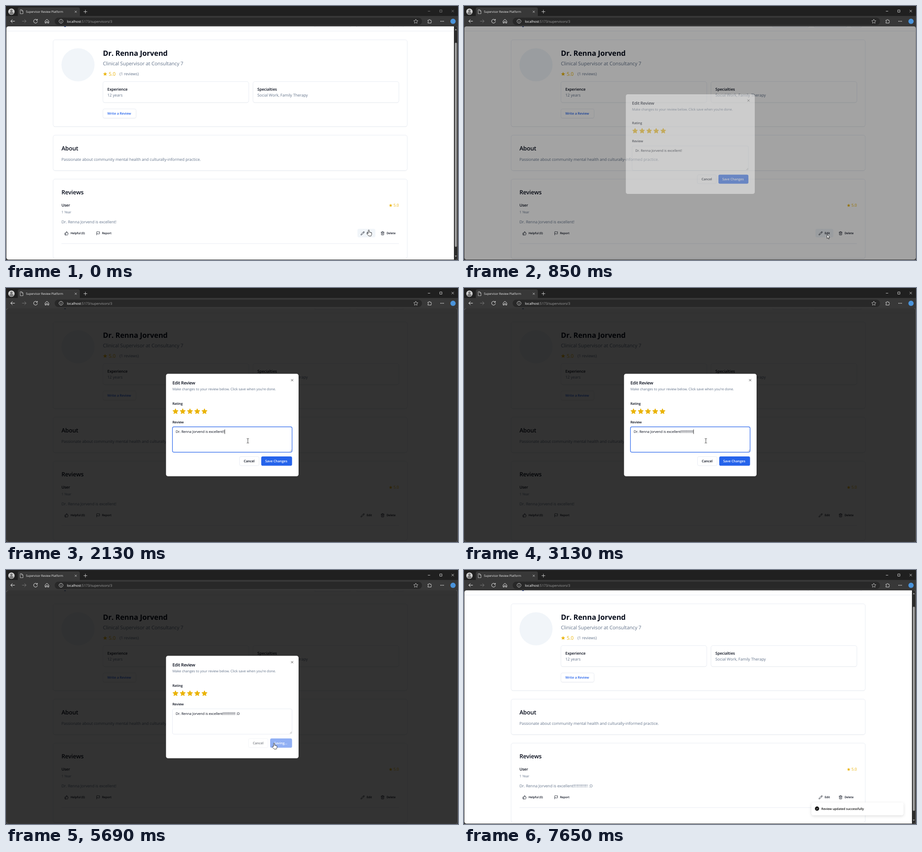
Write an HTML page that moves like this. It is 998 px wide and 561 px high and loops after 8510 ms.

```html
<!DOCTYPE html>
<html lang="en">
<head>
<meta charset="utf-8">
<title>Supervisor Review Platform</title>
<style>
html, body { margin: 0; width: 100%; height: 100%; overflow: hidden; background: #202020; }
svg { display: block; width: 100vw; height: 100vh; }
text { font-family: "Open Sans", "Noto Sans", sans-serif; white-space: pre; text-rendering: geometricPrecision; letter-spacing: -.006em; }
</style>
</head>
<body>
<svg id="stage" viewBox="0 0 998 561">
  <defs><clipPath id="view"><rect x="1" y="45" width="996.5" height="515" rx="4.5"/></clipPath></defs>
</svg>
<script>
const LOOP = 8510, STEP = 140;
const INK = '#020817', MUTED = '#64748b', LINE = '#e2e8f0', BLUE = '#2563eb', GOLD = '#eab308';
const NAME = 'Dr. Renna Jorvend';
const PRAISE = `${NAME} is excellent`;
const stage = document.getElementById('stage');
const $ = id => document.getElementById(id);
const clamp = (v, lo = 0, hi = 1) => Math.min(hi, Math.max(lo, v));

// Drawing helpers
const label = (x, y, size, str, fill = INK, weight = 400, extra = '') =>
  `<text x="${x}" y="${y}" font-size="${(size * (weight > 400 ? .935 : .955)).toFixed(2)}" font-weight="${weight}" fill="${fill}" ${extra}>${str}</text>`;
const box = (x, y, x2, y2, r, fill, extra = '') =>
  `<rect x="${x}" y="${y}" width="${x2 - x}" height="${y2 - y}" rx="${r}" fill="${fill}" ${extra}/>`;
const edge = `stroke="${LINE}" stroke-width=".8"`;
const card = (x, y, x2, y2, r = 4.5) =>
  box(x, y + .9, x2, y2 + .9, r, '#000', 'opacity=".06"') + box(x, y, x2, y2, r, '#fff', edge);
const line = (d, color, w = .9, extra = '') =>
  `<path d="${d}" fill="none" stroke="${color}" stroke-width="${w}" ${extra}/>`;
const cross = (x, y, r, color, w = .9) =>
  line(`M${x - r} ${y - r}l${2 * r} ${2 * r}M${x + r} ${y - r}l${-2 * r} ${2 * r}`, color, w);
const icon = (x, y, d) =>
  `<path transform="translate(${x - 4.57} ${y - 4.57}) scale(.381)" d="${d}" fill="none" stroke="${INK}" stroke-width="2" stroke-linecap="round" stroke-linejoin="round"/>`;
function star(cx, cy, r, inner, extra = '') {
  const pts = Array.from({ length: 10 }, (_, i) => {
    const a = i * Math.PI / 5, d = i % 2 ? r * inner : r;
    return `${(cx + d * Math.sin(a)).toFixed(2)},${(cy - d * Math.cos(a)).toFixed(2)}`;
  });
  return `<polygon points="${pts.join(' ')}" fill="${GOLD}" ${extra}/>`;
}

const ICONS = {
  thumb: 'M7 10v12M15 5.9 14 10h5.8a2 2 0 0 1 1.9 2.6l-2.3 8A2 2 0 0 1 17.5 22H4a2 2 0 0 1-2-2v-8a2 2 0 0 1 2-2h2.8a2 2 0 0 0 1.8-1.1L12 2a3.1 3.1 0 0 1 3 3.9Z',
  flag: 'M4 15s1-1 4-1 5 2 8 2 4-1 4-1V3s-1 1-4 1-5-2-8-2-4 1-4 1zM4 22v-7',
  pencil: 'M17 3a2.8 2.8 0 1 1 4 4L7.5 20.5 2 22l1.5-5.5ZM15 5l4 4',
  trash: 'M3 6h18M19 6v14c0 1-1 2-2 2H7c-1 0-2-1-2-2V6M8 6V4c0-1 1-2 2-2h4c1 0 2 1 2 2v2M10 11v6M14 11v6'
};

const browser = () => [
  box(0, 0, 998, 561, 0, '#202020'),
  box(0, 22, 998, 561, 0, '#383838'),
  box(26, 3, 163, 26, 4, '#383838'),
  '<circle cx="12" cy="12.5" r="7" fill="#cfcfcf"/><circle cx="12" cy="10.4" r="2.6" fill="#777"/><path d="M7.2 16.6a4.8 3.6 0 0 1 9.6 0a6.6 6.6 0 0 1-9.6 0z" fill="#777"/>',
  line('M31.3 8.3h3.7l2.6 2.6v6.1h-6.3zM34.8 8.5v2.6h2.6', '#e0e0e0', .8),
  label(44, 15, 6.8, 'Supervisor Review Platform', '#f2f2f2'),
  cross(154, 12.7, 2.1, '#e0e0e0', .8),
  line('M171.3 12.5h8M175.3 8.5v8', '#d8d8d8'),
  `<g id="controls">${line('M931.5 11.5h5M957.8 8.8h4.8v4.8h-4.8z', 'currentColor', .8)}${cross(986.4, 11.2, 2.5, 'currentColor', .8)}</g>`,
  line('M19.5 33.5h-9M14.4 29.6l-3.9 3.9 3.9 3.9', '#f0f0f0', 1),
  line('M35.5 33.5h9M40.6 29.6l3.9 3.9-3.9 3.9', '#777', 1),
  line('M68.7 31.2a4.2 4.2 0 1 0 .7 2.7M69.3 28.8v2.8h-2.8', '#f0f0f0', 1),
  line('M86.4 33l4-3.6 4 3.6v4.6h-2.6v-3h-2.8v3h-2.6z', '#f0f0f0', 1, 'stroke-linejoin="round"'),
  box(107.5, 25.7, 918.5, 42, 8.1, '#282828'),
  '<circle cx="121.5" cy="33.7" r="4.3" fill="none" stroke="#e0e0e0" stroke-width=".9"/>',
  line('M121.5 33v3M121.5 31v1', '#e0e0e0'),
  label(134.5, 36.6, 7.9, 'localhost<tspan fill="#9d9d9d">:5173/supervisors/3</tspan>', '#fff'),
  star(904.8, 34.1, 5, .48).replace(GOLD, 'none" stroke="#d0d0d0" stroke-width=".8'),
  line('M931.6 31.3h2.2a1.3 1.3 0 0 1 2.6 0h2.2v2.1a1.3 1.3 0 0 1 0 2.5v1.8h-7v-1.9a1.2 1.2 0 0 0 0-2.4z', '#e8e8e8', .9),
  [-3, 0, 3].map(d => `<circle cx="${963 + d}" cy="33.7" r=".85" fill="#eee"/>`).join(''),
  '<circle cx="987" cy="33.8" r="5.8" fill="#4a94dc"/>'
].join('');

const page = () => [
  box(1, 45, 998, 560, 0, '#fff'),
  line('M1 55.3H998', LINE, .8),
  '<circle cx="130.3" cy="44.8" r="1.8" fill="#1e3a8a"/>',
  [[681, 761], [773, 845], [855, 878]].map(([a, b]) => box(a, 30, b, 47, 3, '#fff', edge)).join(''),
  card(104, 74.7, 886, 266.4),
  '<circle cx="159" cy="129.9" r="36.6" fill="#f1f5f9"/>',
  label(214, 110.3, 17.14, NAME, INK, 700),
  label(214, 130.9, 11.43, 'Clinical Supervisor at Consultancy 7', MUTED),
  star(218.8, 150.4, 4.9, .4),
  label(226.7, 154, 11.43, '5.0', GOLD),
  label(250.8, 152.8, 9.14, '(1 reviews)', MUTED),
  card(214, 166.8, 536, 213.3),
  card(545.3, 166.8, 867.5, 213.3),
  label(223.7, 186.5, 9.14, 'Experience', INK, 600),
  label(223.7, 200.2, 9.14, '12 years', MUTED),
  label(555, 186.5, 9.14, 'Specialties', INK, 600),
  label(555, 200.2, 9.14, 'Social Work, Family Therapy', MUTED),
  card(214, 227.3, 287.3, 247.6, 3.4),
  label(223.7, 240.3, 8, 'Write a Review', BLUE, 600),
  card(104, 285.2, 886, 363.5),
  label(122.4, 318.6, 13.71, 'About', INK, 600),
  label(122.4, 341.5, 9.14, 'Passionate about community mental health and culturally-informed practice.', MUTED),
  card(104, 382.3, 886, 557.6),
  label(122.4, 415.8, 13.71, 'Reviews', INK, 600),
  label(122.4, 443.2, 9.14, 'User', INK, 600),
  label(122.4, 457.6, 8, '1 Year', MUTED),
  star(849.3, 440.6, 4, .4),
  label(855.4, 443.4, 9.14, '5.0', GOLD),
  label(122.4, 479.8, 9.14, '', MUTED, 400, 'id="posted"'),
  box(776, 492.3, 815.5, 511, 3.4, '#f1f5f9', 'id="hover"'),
  icon(133.6, 502, ICONS.thumb), label(142.5, 504.4, 6.86, 'Helpful (0)', INK, 600),
  icon(203.5, 502, ICONS.flag), label(212, 504.4, 6.86, 'Report', INK, 600),
  icon(787.5, 502, ICONS.pencil), label(796.2, 504.4, 6.86, 'Edit', INK, 600),
  icon(831.5, 502, ICONS.trash), label(840.2, 504.4, 6.86, 'Delete', INK, 600),
  line('M122.4 524.8H867.6', LINE, .8),
  '<g id="scrollbar">', box(989, 45, 998, 560, 0, '#2c2c2c'),
  box(991, 81, 995.6, 532, 2.3, '#9f9f9f'),
  '<path d="M990.8 53.4h4.8l-2.4-3zM990.8 551.3h4.8l-2.4 3z" fill="#9f9f9f"/></g>'
].join('');

const footer = (id, x, save, saveX, opacity) => `<g id="${id}" opacity="${opacity}">` +
  box(x, 372.2, x + 43.3, 392.4, 3.4, '#fff', edge) +
  label(x + 9.6, 385.2, 8, 'Cancel', INK, 600) +
  box(saveX, 372, 631.6, 392.6, 3.4, BLUE) +
  label(saveX + 8.7, 385.2, 8, save, '#fff', 600) + '</g>';

const dialog = () => [
  box(0, 45, 998, 561, 0, '#000', 'id="shade"'),
  '<g id="dialog">',
  box(353.3, 189.5, 646, 415.7, 4.5, '#fff'),
  label(367.4, 212.6, 10.29, 'Edit Review', INK, 600, 'style="letter-spacing:-.025em"'),
  label(367.4, 226.2, 8, 'Make changes to your review below. Click save when you’re done.', MUTED),
  cross(631.8, 203.6, 2.4, '#444'),
  label(367.4, 257.6, 8, 'Rating', INK, 600),
  [0, 1, 2, 3, 4].map(i => star(374.2 + i * 16, 272.7, 6, .47, `stroke="${GOLD}" stroke-width="1.1" stroke-linejoin="round"`)).join(''),
  label(367.4, 298.7, 8, 'Review', INK, 600),
  box(367.5, 306.7, 631.6, 362.6, 3.4, '#fff', 'id="field"'),
  line('M626.8 361.2l4-4M629 361.2l1.8-1.8', '#777', .6),
  label(374.7, 320.2, 8, '', INK, 400, 'id="typed"'),
  line('M0 312.4v10', '#000', .8, 'id="caret"'),
  footer('idle', 515.5, 'Save Changes', 563.5, 1),
  footer('saving', 535.3, 'Saving...', 583.2, .5),
  '</g>'
].join('');

const toast = () => '<g id="toast" style="filter:drop-shadow(0 2px 3.4px rgba(0,0,0,.13))">' +
  box(767, 513.5, 970.6, 541.7, 4.5, '#fff') +
  '<circle cx="779.5" cy="527" r="4.7" fill="#111"/>' +
  line('M777.4 527.1l1.5 1.5 2.8-2.9', '#fff', .9) +
  label(789, 529.8, 7.43, 'Review updated successfully', '#111', 600) + '</g>';

const pointers = () => '<g id="pointer" stroke="#000" stroke-width=".75" stroke-linejoin="round" fill="#fff">' +
  '<path id="arrow" d="M0 0V8.8L2 7 3.4 10 4.7 9.4 3.4 6.5H6.1Z"/>' +
  '<path id="hand" d="M-1.1 7.6V1a1.1 1.1 0 0 1 2.2 0V4.8l4 .9q1.2.3 1.2 1.5V9.5q0 1.2-.6 2.2L5 13.3H.2L-3.6 9.2q-.9-1.1 0-1.8.8-.6 1.6.1z"/>' +
  '<path id="beam" fill="none" d="M-2.3-5Q0-5 0-4.2Q0-5 2.3-5M0-4.2V4.2M-2.3 5Q0 5 0 4.2Q0 5 2.3 5"/></g>';

stage.insertAdjacentHTML('beforeend',
  browser() + `<g clip-path="url(#view)">${page()}${dialog()}${toast()}</g>` + pointers());

// Bursts of movement: start time and number of steps
const BURSTS = [[0, 1], [140, 3], [850, 5], [1700, 2], [2130, 2], [2560, 1], [2850, 6], [3980, 5], [5120, 2], [5690, 8], [6810, 7]];
function snap(t) {
  const [start, steps] = BURSTS.findLast(b => b[0] <= t);
  return start + Math.min(steps - 1, Math.floor((t - start) / STEP)) * STEP;
}

// Pointer path: time, x, y, shape
const PATH = [
  [0, 801, 494.7, 'hand'], [420, 801, 504.3, 'hand'], [850, 801.6, 504.7, 'arrow'],
  [990, 728.7, 497.3, 'arrow'], [1270, 570, 382, 'arrow'], [1410, 533.2, 336.5, 'beam'],
  [1840, 534, 337.5, 'beam'], [3550, 534, 337.5, 'beam'], [3980, 541, 347, 'beam'],
  [4120, 562, 366, 'arrow'], [4260, 585, 384, 'hand'], [4400, 592, 389, 'hand'],
  [4540, 592, 382.3, 'hand'], [5690, 592, 382.3, 'hand'], [5830, 591.8, 382.3, 'arrow'],
  [6390, 660, 446, 'arrow'], [6670, 720.5, 508, 'arrow'], [7510, 299, 460, 'arrow'], [7650, 299, 460, '']
];
function pointerAt(t) {
  const i = PATH.findLastIndex(k => k[0] <= t);
  const a = PATH[i], b = PATH[i + 1] || a;
  const f = b === a ? 0 : (t - a[0]) / (b[0] - a[0]);
  return [a[1] + (b[1] - a[1]) * f, a[2] + (b[2] - a[2]) * f, a[3]];
}

function typedAt(t) {
  const held = t < 2130 ? 1 : t < 2560 ? 2 : t < 2850 ? 3 : Math.min(14, 6 + Math.floor((t - 2850) / 35));
  return PRAISE + '!'.repeat(held) + ' :D'.slice(0, clamp((t - 3130) / STEP, 0, 3));
}

const show = (id, on) => $(id).style.display = on ? '' : 'none';
const set = (id, attrs) => { for (const k in attrs) $(id).setAttribute(k, attrs[k]); };

function render(time) {
  const t = snap(time);
  const done = t >= 5830;
  const open = done ? 0 : clamp((t - 760) / 200);
  const focused = t >= 1410 && t < 4540;

  $('controls').style.color = t < 850 ? '#8c8c8c' : '#f0f0f0';
  show('scrollbar', !open);
  show('hover', t < 990);
  $('posted').textContent = done ? typedAt(t) : PRAISE + '!';

  set('shade', { opacity: open * .8 });
  show('dialog', open > 0);
  set('dialog', {
    opacity: open,
    transform: `translate(499.7 ${302.6 + 4.5 * (1 - open)}) scale(${.95 + .05 * open}) translate(-499.7 -302.6)`
  });
  set('field', { stroke: focused ? BLUE : LINE, 'stroke-width': focused ? 1.2 : .8 });
  $('typed').textContent = typedAt(t);
  show('caret', focused && t < 4120 && !(t >= 1840 && t < 2130));
  if (open) set('caret', { transform: `translate(${375 + $('typed').getComputedTextLength()} 0)` });
  show('idle', t < 5120);
  show('saving', t >= 5120);

  const rise = 1 - Math.pow(1 - clamp((t - 5690) / 400), 2.7);
  show('toast', rise > 0);
  set('toast', { opacity: rise, transform: `translate(0 ${30 * (1 - rise)})` });

  const [x, y, shape] = pointerAt(t);
  set('pointer', { transform: `translate(${x} ${y})` });
  for (const id of ['arrow', 'hand', 'beam']) show(id, id === shape);
}

const begin = performance.now();
function tick() {
  render((performance.now() - begin) % LOOP);
  requestAnimationFrame(tick);
}
tick();
</script>
</body>
</html>
```
